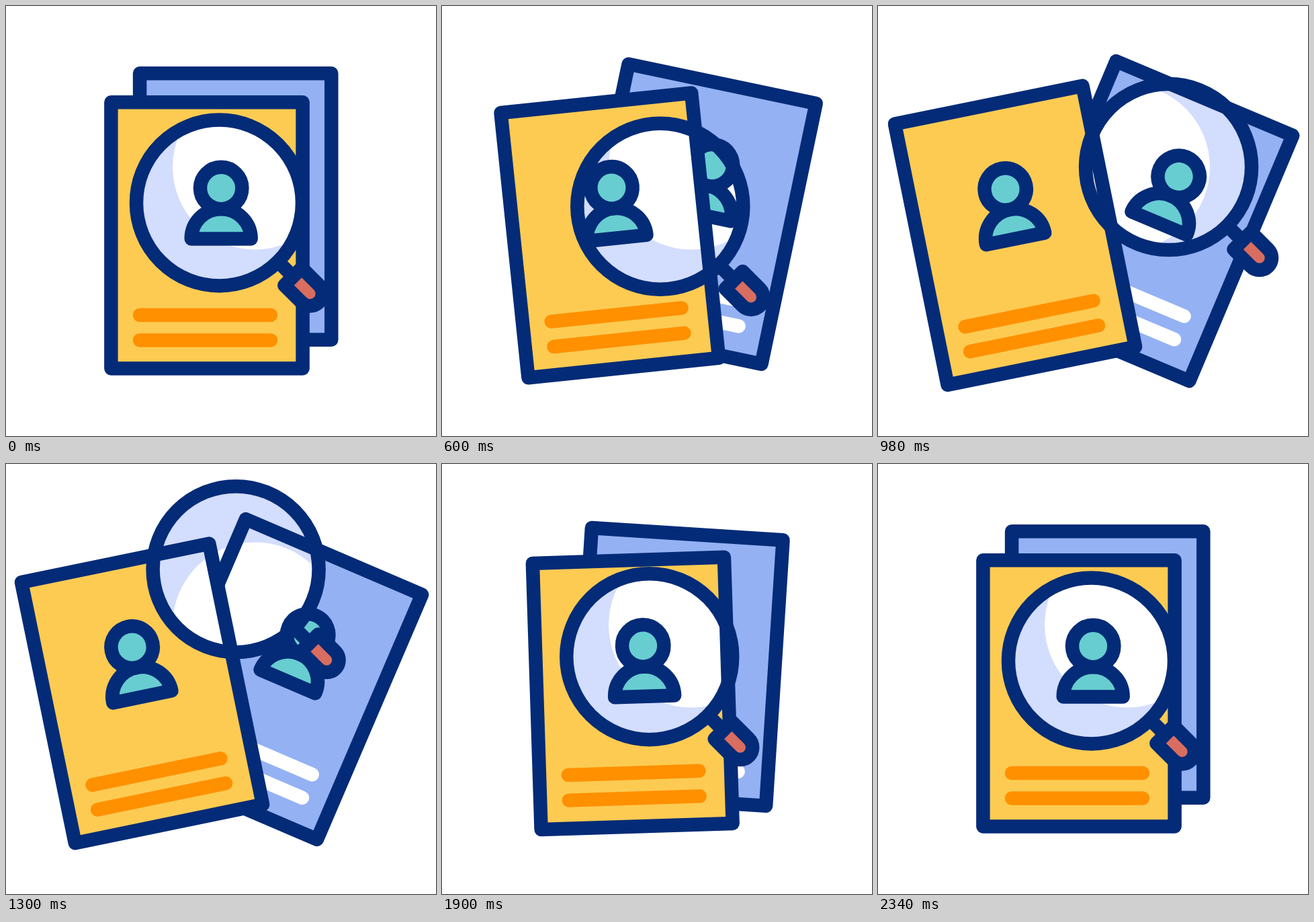
Recreate the animation shown at these times as an HTML page with a canvas. Size 640x640 px, loop 2400 ms.

```html
<!DOCTYPE html>
<html lang="en">
<head>
<meta charset="utf-8">
<title>Profile search</title>
<style>
  html, body { margin: 0; width: 100%; height: 100%; overflow: hidden; background: #fff; }
  canvas { display: block; width: 640px; height: 640px; }
</style>
</head>
<body>
<canvas id="stage"></canvas>
<script>
const LOOP = 2400, LINE = 20.5;
const NAVY = '#032b77', YELLOW = '#fdcb52', BLUE = '#94b1f3', LENS = '#d3ddfd',
      TEAL = '#67cdd1', ORANGE = '#ff9000', RED = '#d96d60', WHITE = '#fff';
const CARD_W = 285.2, CARD_H = 396.4;

const canvas = document.getElementById('stage');
const ctx = canvas.getContext('2d');
const ratio = window.devicePixelRatio || 1;
canvas.width = canvas.height = 640 * ratio;

// Lens path: time, offset x, y, velocity x, y (px per ms)
const PATH = [
  [555, 0, 0, 0, 0],
  [600, 7, 5, .3, .2],
  [980, 115, -53, .05, -.39],
  [1300, 25, -136.5, -.38, .13],
  [1600, -56, -81, -.03, .33],
  [1900, -9, -6.5, .24, .175],
  [1974, 0, 0, 0, 0]
];

const bez = (a, b, u) => 3 * a * u * (1 - u) ** 2 + 3 * b * u * u * (1 - u) + u ** 3;

function ease(x) {
  if (x <= 0) return 0;
  if (x >= 1) return 1;
  let lo = 0, hi = 1;
  for (let i = 0; i < 30; i++) {
    const mid = (lo + hi) / 2;
    if (bez(.82, .18, mid) < x) lo = mid; else hi = mid;
  }
  return bez(.04, .96, lo);
}

// How far the cards are fanned out, 0 to 1
const spread = t => t < 1180 ? ease((t - 20) / 1160) : 1 - ease((t - 1180) / 1160);

function hermite(p, q, v, w, s) {
  const r = 1 - s;
  return (1 + 2 * s) * r * r * p + s * r * r * v + s * s * (3 - 2 * s) * q - s * s * r * w;
}

function lensAt(t) {
  const home = [317.5, 293];
  const i = PATH.findIndex(k => k[0] > t);
  if (i < 1) return home;
  const a = PATH[i - 1], b = PATH[i], dt = b[0] - a[0], s = (t - a[0]) / dt;
  return home.map((h, n) =>
    h + hermite(a[n + 1], b[n + 1], a[n + 3] * dt, b[n + 3] * dt, s));
}

function at(x, y, deg, draw) {
  ctx.save();
  ctx.translate(x, y);
  ctx.rotate(deg * Math.PI / 180);
  draw();
  ctx.restore();
}

function disc(x, y, r, color) {
  ctx.beginPath();
  ctx.arc(x, y, r, 0, 2 * Math.PI);
  ctx.fillStyle = color;
  ctx.fill();
}

function outline(color = NAVY) {
  ctx.strokeStyle = color;
  ctx.stroke();
}

function cardPath() {
  ctx.beginPath();
  ctx.rect(-CARD_W / 2, -CARD_H / 2, CARD_W, CARD_H);
}

function cardFace(color, bars, x1, x2, y) {
  cardPath();
  ctx.fillStyle = color;
  ctx.fill();
  for (const dy of [0, 37.6]) {
    ctx.beginPath();
    ctx.moveTo(x1, y + dy);
    ctx.lineTo(x2, y + dy);
    outline(bars);
  }
}

function person(x, y) {
  ctx.fillStyle = TEAL;
  ctx.beginPath();
  ctx.arc(x, y + 75.5, 44.5, Math.PI, 2 * Math.PI);
  ctx.closePath();
  ctx.fill();
  outline();
  disc(x, y, 31.2, TEAL);
  outline();
}

// The glint is a fixed white disc seen through the moving lens
function glass(x, y) {
  ctx.save();
  disc(x, y, 123.5, LENS);
  ctx.clip();
  disc(371, 239.5, 123, WHITE);
  ctx.restore();
}

function frameAndHandle() {
  ctx.beginPath();
  ctx.arc(0, 0, 123.5, 0, 2 * Math.PI);
  outline();
  ctx.rotate(Math.PI / 4);
  ctx.beginPath();
  ctx.moveTo(123.5, 0);
  ctx.lineTo(155, 0);
  outline();
  ctx.beginPath();
  ctx.moveTo(155.2, -18.25);
  ctx.arc(191.2, 0, 18.25, -Math.PI / 2, Math.PI / 2);
  ctx.lineTo(155.2, 18.25);
  ctx.closePath();
  ctx.fillStyle = RED;
  ctx.fill();
  outline();
}

function render(t) {
  const e = spread(t), [lx, ly] = lensAt(t);
  const back = draw => at(341.7 + 69 * e, 298.5 + 22.2 * e, 23.45 * e, draw);
  const front = draw => at(299 - 97.5 * e, 341.4, -11.75 * e, draw);

  ctx.setTransform(ratio, 0, 0, ratio, 0, 0);
  ctx.fillStyle = WHITE;
  ctx.fillRect(0, 0, 640, 640);
  ctx.lineWidth = LINE;
  ctx.lineCap = ctx.lineJoin = 'round';

  back(() => cardFace(BLUE, WHITE, -97, 98, 112.3));
  glass(lx, ly);
  back(() => {
    cardPath();
    outline();
    person(10, -76.2);
  });

  // The front card hides the back one, also inside the lens
  ctx.save();
  front(() => {
    cardPath();
    ctx.clip();
  });
  ctx.restore();
  ctx.save();
  const m = ctx.getTransform();
  ctx.translate(299 - 97.5 * e, 341.4);
  ctx.rotate(-11.75 * e * Math.PI / 180);
  cardPath();
  ctx.clip();
  cardFace(YELLOW, ORANGE, -100, 95, 118.5);
  ctx.setTransform(m);
  glass(lx, ly);
  ctx.restore();
  front(() => {
    cardPath();
    outline();
    person(21.2 - 22.2 * e, -70.4);
  });

  at(lx, ly, 0, frameAndHandle);
}

const start = performance.now();
function tick() {
  render((performance.now() - start) % LOOP);
  requestAnimationFrame(tick);
}
tick();
</script>
</body>
</html>
```
